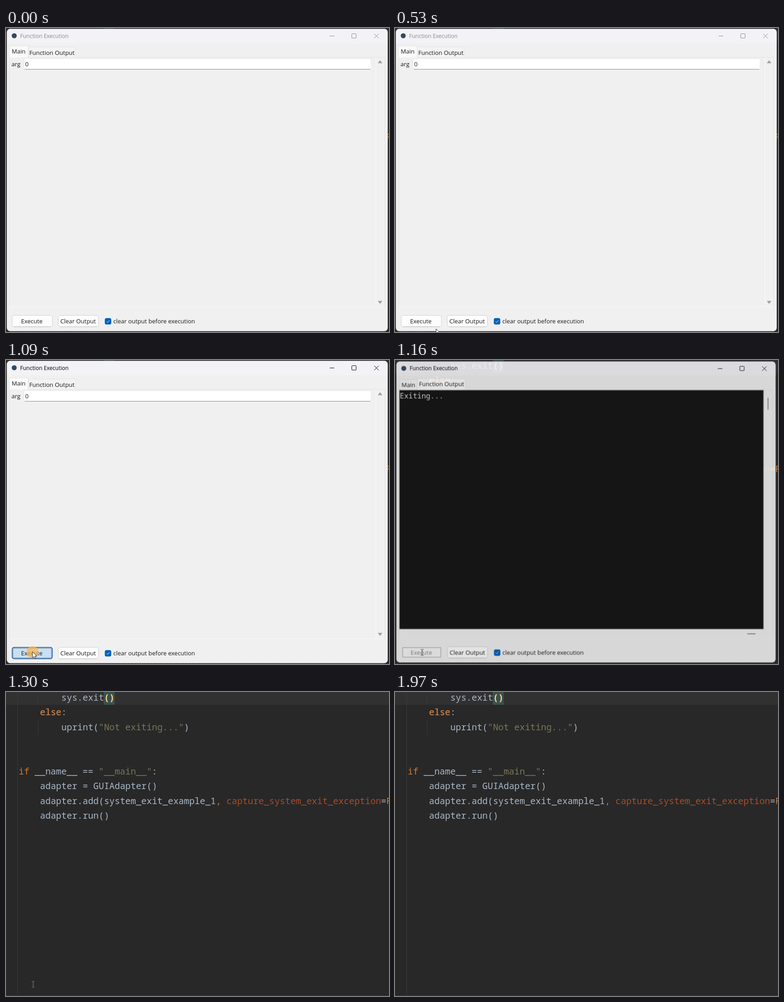
An HTML page that plays this animation: 839x667 px, repeating every 2840 ms.

```html
<!DOCTYPE html>
<html lang="en">
<head>
<meta charset="utf-8">
<title>Function Execution</title>
<style>
  html, body { margin: 0; width: 100%; height: 100%; overflow: hidden; background: #282828; }
  svg { display: block; width: 839px; height: 667px; }
  text { white-space: pre; }

  .ui { font: 13px "Open Sans", "Noto Sans", sans-serif; fill: #1a1a1a; }
  .title { font-size: 12px; fill: currentColor; }
  .code { font: 19.47px "Noto Sans Mono", "DejaVu Sans Mono", monospace; fill: #a9b7c6; }
  .console { font: 16px "Noto Sans Mono", "DejaVu Sans Mono", monospace; fill: #d8d8d8; }
  .key { fill: #cc7832; }
  .str { fill: #7a7658; }
  .param { fill: #a84d26; }
  .paren { fill: #ffd68a; font-weight: bold; }

  .line { fill: none; stroke: #e3e3e3; }
  .tab { fill: #f3f3f3; stroke: #e5e5e5; }
  .tab.on { fill: #fafafa; }
  .button { fill: #fdfdfd; stroke: #d0d0d0; }
  .disabled { fill: #838383; }
  .focus { fill: none; stroke: #333; stroke-dasharray: 1 1; }
  .icons { fill: none; stroke: currentColor; }
  .beam { fill: none; stroke: #b8b8b8; mix-blend-mode: difference; }

  /* One shared 2840 ms loop; every change is a hard cut. */
  .window, .chrome, .before, .after, .execute, .press, .arrow, .beam, .remnant, .backing {
    animation: 2840ms step-end infinite;
  }
  .window { animation-name: close; }
  .chrome { animation-name: activate; }
  .before { animation-name: before; }
  .after { animation-name: after; }
  .execute { animation-name: hover; }
  .press { animation-name: press; }
  .arrow { animation-name: point; }
  .beam { animation-name: beam; }
  .remnant { animation-name: remnant; }
  .backing { animation-name: backing; }

  @keyframes close {
    0% { opacity: 1; transform: none; }
    40.84% { opacity: .885; transform: translate(1.3px, 1.4px) scale(.9955); }
    43.3% { opacity: .44; transform: translate(12px, 10.2px) scale(.9665); }
    45.77%, 100% { opacity: 0; }
  }
  @keyframes activate {
    0% { color: #8a8a8a; }
    35.91%, 100% { color: #000; }
  }
  @keyframes before {
    0% { opacity: 1; }
    40.84%, 100% { opacity: 0; }
  }
  @keyframes after {
    0% { opacity: 0; }
    40.84%, 100% { opacity: 1; }
  }
  @keyframes hover {
    0% { fill: #fdfdfd; stroke: #d0d0d0; }
    21.12% { fill: #e0eef9; stroke: #0078d4; }
    35.91% { fill: #c9dff3; stroke: #10559c; stroke-width: 1.5px; }
    40.84%, 100% { fill: #f4f4f4; stroke: #efefef; }
  }
  @keyframes press {
    0% { opacity: 0; }
    35.91% { opacity: 1; }
    40.84%, 100% { opacity: 0; }
  }
  @keyframes point {
    0% { opacity: 0; }
    13.02% { opacity: 1; transform: translate(97px, 665px); }
    15.84% { opacity: 1; transform: translate(94px, 663px); }
    18.66% { opacity: 1; transform: translate(90px, 660px); }
    21.12% { opacity: 1; transform: translate(78px, 652px); }
    23.59% { opacity: 1; transform: translate(67px, 645px); }
    26.05% { opacity: 1; transform: translate(60px, 641px); }
    28.87% { opacity: 1; transform: translate(58px, 640px); }
    40.84%, 100% { opacity: 0; }
  }
  @keyframes beam {
    0% { opacity: 0; }
    40.84% { opacity: 1; transform: translate(59.5px, 641.5px); }
    43.3% { opacity: 0; }
    45.77% { opacity: 1; transform: translate(59.5px, 641.5px); }
    66.9% { opacity: 1; transform: translate(67.5px, 641.5px); }
    69.36%, 100% { opacity: 0; }
  }
  @keyframes remnant {
    0% { opacity: 0; }
    43.3% { opacity: .17; }
    45.77%, 100% { opacity: 0; }
  }
  @keyframes backing {
    0% { opacity: 0; }
    40.84% { opacity: 1; }
    43.3%, 100% { opacity: 0; }
  }
</style>
</head>
<body>
<svg viewBox="0 0 839 667">
  <!-- code editor -->
  <rect width="839" height="667" fill="#282828"/>
  <rect width="839" height="28" fill="#313131"/>
  <path d="M25.5 0V663M70.5 0V28M70.5 61V93" stroke="#393939"/>
  <path d="M0 666.5H839" stroke="#484848" stroke-dasharray="3 2"/>
  <rect x="214" width="24" height="28" fill="#3b514d"/>
  <g class="code" transform="translate(.7 0)">
    <text x="120.6" y="19">sys.exit<tspan class="paren">()</tspan></text>
    <text x="73.9" y="51">else</text>
    <text x="73.9" y="51"><tspan class="key">else</tspan>:</text>
    <text x="120.6" y="83.6">uprint(<tspan class="str">"Not exiting..."</tspan>)</text>
    <text x="27.1" y="181"><tspan class="key">if</tspan> __name__ == <tspan class="str">"__main__"</tspan>:</text>
    <text x="73.9" y="213.3">adapter = GUIAdapter()</text>
    <text x="73.9" y="245.6">adapter.add(system_exit_example_1<tspan class="key">,</tspan> <tspan class="param">capture_system_exit_exception</tspan>=<tspan class="key">False)</tspan></text>
    <text x="73.9" y="278">adapter.run()</text>
  </g>
  <!-- keeps the code from showing through the console at first -->
  <rect class="backing" x="10" y="66" width="797" height="525" fill="#636363"/>

  <!-- application window -->
  <g class="window ui">
    <rect x="1.5" y="1.5" width="835" height="664" rx="8" fill="#f0f0f0" stroke="#000" stroke-opacity=".35"/>
    <path d="M2 34V10a8 8 0 0 1 8-8H828a8 8 0 0 1 8 8V34Z" fill="#f3f2f6"/>
    <circle cx="18" cy="17" r="5.5" fill="#2f4a66"/>
    <g class="chrome">
      <text class="title" x="31" y="21.5">Function Execution</text>
      <g class="icons">
        <path d="M709 17.5H719M806.5 12.5L816.5 22.5M816.5 12.5L806.5 22.5"/>
        <rect x="757.5" y="12.5" width="9.5" height="9.5" rx="1"/>
      </g>
    </g>

    <rect class="line" x="7.5" y="64.5" width="822" height="547"/>
    <path d="M8 611.5H829" stroke="#fafafa"/>

    <g class="before">
      <rect class="tab" x="49.5" y="41.5" width="102" height="23"/>
      <rect class="tab on" x="7.5" y="39.5" width="41" height="25"/>
      <path d="M8 64.5H48" stroke="#f4f4f4"/>
      <text x="12.5" y="56">Main</text>
      <text x="51" y="58.5">Function Output</text>
      <text x="12" y="83.5">arg</text>
      <rect x="39.5" y="67.5" width="760" height="23" rx="3" fill="#fff" stroke="#ebebeb"/>
      <path d="M41 90.5H798" stroke="#868686"/>
      <text x="42" y="83.5">0</text>
      <path d="M810.5 65V611" stroke="#fcfcfc"/>
      <path d="M815 77L819.5 71L824 77ZM815 599L819.5 605L824 599Z" fill="#a0a0a0" stroke="#a0a0a0" stroke-width=".6" stroke-linejoin="round"/>
    </g>

    <g class="after">
      <rect class="tab" x="9.5" y="41.5" width="38" height="23"/>
      <rect class="tab on" x="47.5" y="39.5" width="106" height="25"/>
      <text x="13" y="58.5">Main</text>
      <text x="51.5" y="56.5">Function Output</text>
      <rect x="8.5" y="65" width="801" height="526.5" fill="#0c0c0c" stroke="#858585"/>
      <text class="console" x="9.3" y="83">Exiting...</text>
      <path d="M819.5 82V108M774 602H792" stroke="#858585" stroke-width="2"/>
    </g>

    <rect class="button execute" x="13.5" y="630.5" width="88" height="25" rx="4"/>
    <text class="before" x="33" y="648">Execute</text>
    <text class="after disabled" x="33" y="648">Execute</text>
    <rect class="focus press" x="15.5" y="632.5" width="84" height="21"/>
    <rect class="focus after" x="15.5" y="632.5" width="84" height="21"/>
    <rect class="button" x="114.5" y="630.5" width="88" height="25" rx="4"/>
    <path d="M118 655.5H199" stroke="#bbb"/>
    <path class="before" d="M17 655.5H98" stroke="#000" stroke-opacity=".15"/>
    <text x="119" y="648">Clear Output</text>
    <rect x="216.5" y="636.5" width="14" height="14" rx="3.5" fill="#005fb8"/>
    <path d="M220.3 643.8L222.6 646L226.8 641.4" fill="none" stroke="#fff"/>
    <text x="235" y="648">clear output before execution</text>
  </g>

  <path class="remnant" d="M393 12h2v16h-2zM400 12H473V28H464V22H461V28H408V12H407V28H400ZM476 12h3v16h-3z" fill="#fff"/>

  <!-- pointer -->
  <circle class="press" cx="58" cy="641" r="13" fill="#f8b552" fill-opacity=".75"/>
  <path class="arrow" d="M0 0V13.5L3 10.8L5.2 15.6L7.4 14.6L5.3 9.9H9.5Z" fill="#fff" stroke="#111" stroke-width=".9"/>
  <path class="beam" d="M-3 -6.5H-1L0 -5.5L1 -6.5H3M0 -5.5V5.5M-3 6.5H-1L0 5.5L1 6.5H3"/>
</svg>
</body>
</html>
```
